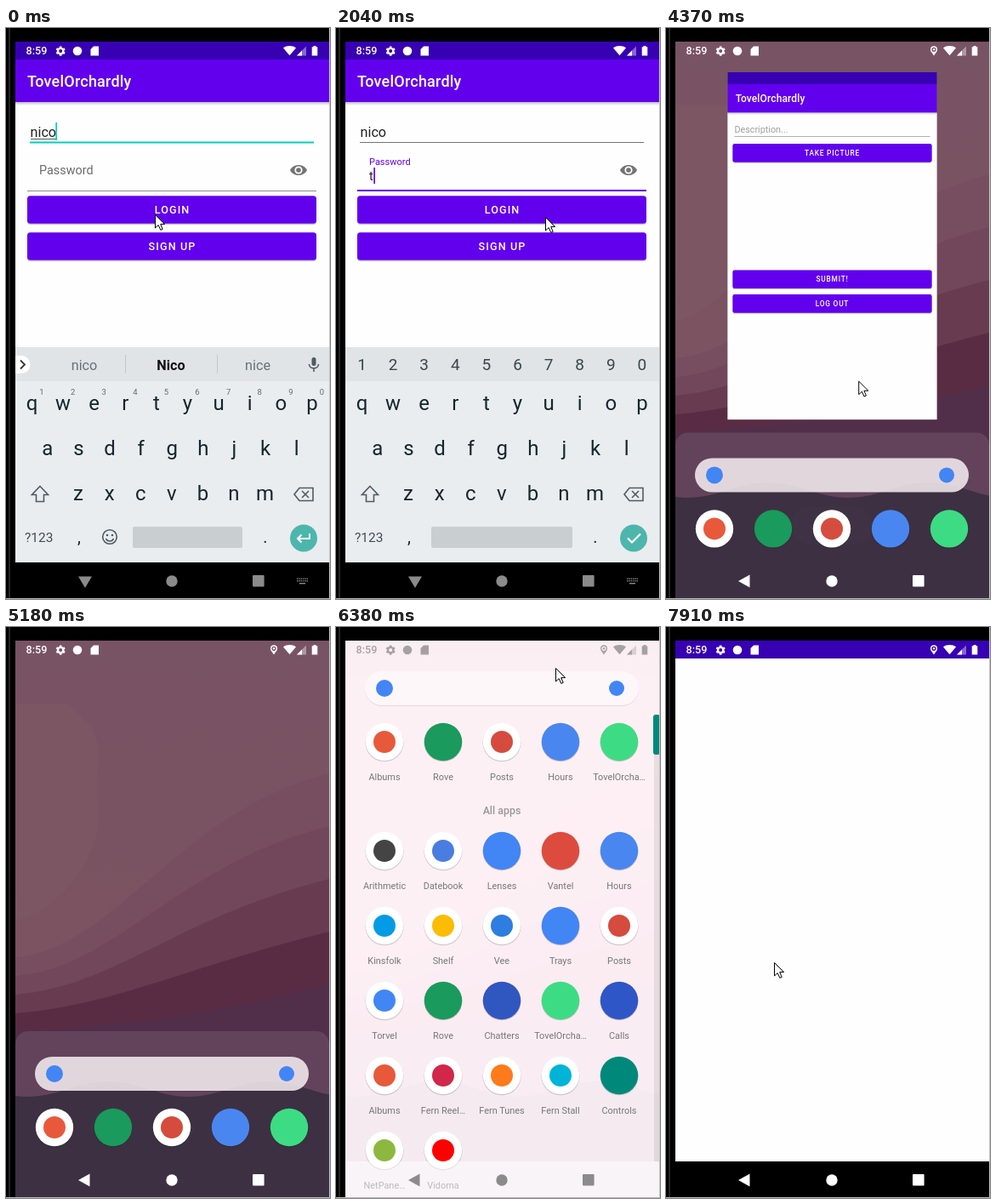
An HTML page that plays this animation: 381 px wide and 671 px high, repeating every 8000 ms.

```html
<!DOCTYPE html>
<html lang="en">
<head>
<meta charset="utf-8">
<title>Login and relaunch</title>
<style>
html, body { margin: 0; width: 100%; height: 100%; overflow: hidden; background: #000; }
svg { display: block; width: 100vw; height: 100vh; }
text { font-family: Roboto, "Open Sans", sans-serif; white-space: pre; }
</style>
</head>
<body>
<svg id="stage" viewBox="0 0 381 671"></svg>
<script>
const LOOP = 8000, STEP = 136;
const PURPLE = '#6200ee', DARK = '#3700b3', INK = '#14262e', SOFT = '#4f5b62';
const APP = 'TovelOrchardly';

// ---- markup helpers ----
const range = n => [...Array(n).keys()];
const rect = (x, y, w, h, fill, more = '') =>
  `<rect x="${x}" y="${y}" width="${w}" height="${h}" fill="${fill}" ${more}/>`;
const band = (y, h, fill, more) => rect(11, y, 369, h, fill, more);
const disc = (x, y, r, fill, more = '') => `<circle cx="${x}" cy="${y}" r="${r}" fill="${fill}" ${more}/>`;
const path = (d, fill, more = '') => `<path d="${d}" fill="${fill}" ${more}/>`;
const line = (d, color, w = 1.6) => path(d, 'none', `stroke="${color}" stroke-width="${w}"`);
const text = (x, y, size, str, fill, more = '') =>
  `<text x="${x}" y="${y}" font-size="${size}" fill="${fill}" ${more}>${str}</text>`;
const mid = (x, y, size, str, fill, more = '') => text(x, y, size, str, fill, `text-anchor="middle" ${more}`);
const group = (id, ...parts) => `<g id="${id}">${parts.join('')}</g>`;
const button = (x, y, w, str) =>
  rect(x, y + 1, w, 33, '#000', 'rx="4" opacity=".22"') + rect(x, y, w, 32.5, PURPLE, 'rx="3.5"') +
  mid(195.5, y + 21, 12.6, str, '#fff', 'font-weight="500" letter-spacing="1.1"');

// ---- app icons: name, colour, plain (fills the plate) ----
const icons = {
  albums: ['Albums', '#e8593c'], rove: ['Rove', '#1a9a5c', 1], posts: ['Posts', '#d54b3d'],
  hours: ['Hours', '#4a86f0', 1], own: [APP.slice(0, 10) + '…', '#3ddc84', 1],
  sums: ['Arithmetic', '#444'], dates: ['Datebook', '#4a7de0'], lens: ['Lenses', '#4285f4', 1],
  web: ['Vantel', '#dd4b3e', 1], kin: ['Kinsfolk', '#039be5'], shelf: ['Shelf', '#fbbc05'],
  vee: ['Vee', '#2e7de0'], trays: ['Trays', '#4285f4', 1], find: ['Torvel', '#4285f4'],
  chat: ['Chatters', '#3056c0', 1], call: ['Calls', '#2f56c6', 1], reel: ['Fern Reel…', '#d0274a'],
  tune: ['Fern Tunes', '#ff7a1a'], stall: ['Fern Stall', '#00b4d8'], ctrl: ['Controls', '#00897b', 1],
  pane: ['NetPane…', '#8cb83f'], vid: ['Vidorna', '#f00']
};
const icon = (key, x, y) => {
  const [, color, plain] = icons[key];
  return disc(x, y + 0.8, 22.5, '#000', 'opacity=".2"') +
    disc(x, y, 22.2, plain ? color : '#fff') + (plain ? '' : disc(x, y, 13, color));
};
const tag = (key, x, y) => mid(x, y + 45, 10.9, icons[key][0], '#777');
const cells = (fn, keys, y) => keys.split(' ').map((k, i) => fn(k, 57 + 69 * i, y)).join('');
const grid = fn => cells(fn, 'albums rove posts hours own', 135) +
  ['sums dates lens web hours', 'kin shelf vee trays posts', 'find rove chat own call',
    'albums reel tune stall ctrl', 'pane vid'].map((keys, r) => cells(fn, keys, 263 + 88 * r)).join('');

// ---- screens ----
const dunes = ['#d88dae', '#cf80a5', '#bd6b92', '#a4507a', '#935687'].map((fill, i) => {
  const l = 388 + 22 * i, r = 172 + 62 * i;
  return path(`M11 ${l}C130 ${l - 10} 200 ${r + 45} 380 ${r}V671H11Z`, fill);
}).join('');
const hills = path('M11 671' + range(38).map(i => {
  const x = 11 + 10 * i;
  return `L${x} ${543 - 9 * Math.cos((x - 120) / 30)}`;
}).join('') + 'V671Z', '#46304f');
const wall = band(16, 655, 'url(#sky)') +
  path('M11 90H70C130 130 100 160 108 210S70 330 11 345Z', '#e6a2b4', 'opacity=".6"') +
  dunes + hills + group('shade', band(16, 50, 'url(#dusk)'));

const login = group('login',
  band(87, 541, '#fefefe'),
  text(28.5, 128, 16.2, 'nico', '#222'),
  group('userOn', rect(28, 133.5, 334, 2, '#03cfbd'), rect(29, 130, 30, 1, '#555'),
    group('userCaret', rect(58.3, 111, 1.7, 21, '#03cfbd'))),
  group('userOff', rect(28, 134, 334, 1, '#757575')),
  group('passOff', text(39, 172, 14.4, 'Password', '#6b6b6b'), rect(25, 191, 340, 1, '#8a8a8a')),
  group('passOn', text(39, 161, 11, 'Password', PURPLE), rect(25, 190, 340, 2, PURPLE),
    group('typed', text(39, 179, 14.4, 't', '#222')), group('passCaret', rect(44.3, 164, 1.7, 19, PURPLE))),
  path('M334 167C338 159 350 159 354 167C350 175 338 175 334 167Z', '#747474'),
  disc(344, 167, 4.6, '#fff'), disc(344, 167, 2.8, '#747474'),
  button(25, 197.3, 340, 'LOGIN'), button(25, 240.3, 340, 'SIGN UP'),
  group('press', rect(25, 197.3, 340, 32.5, '#fff', 'rx="3.5" opacity=".2"')));

const main = group('main',
  band(87, 541, '#fefefe'),
  text(23, 123, 16.2, 'Description...', '#a0a0a0'), rect(23, 128.7, 345, 1, '#8c8c8c'),
  button(20, 142, 351, 'TAKE PICTURE'), button(20, 364.4, 351, 'SUBMIT!'), button(20, 407.4, 351, 'LOG OUT'));

const keyRow = (chars, x, y, size, fill) =>
  [...chars].map((c, i) => mid(x + 36.6 * i, y, size, c, fill)).join('');
const keys = group('keys',
  band(375, 253, '#e9edf0'), band(375, 40, '#e0e4e7'),
  keyRow('qwertyuiop', 30.5, 449, 24, INK), keyRow('asdfghjkl', 48.8, 502, 24, INK),
  keyRow('zxcvbnm', 85, 555, 24, INK),
  line('M40 538.5L49.5 548.5H44.5V556.5H35.5V548.5H30.5Z', SOFT),
  line('M345 540.5H361V555.5H345L339 548ZM348 544L356 552M356 544L348 552', SOFT),
  text(22, 604, 15.5, '?123', '#3f4d54'), mid(86, 605, 20, ',', INK), mid(305, 605, 20, '.', INK),
  disc(350, 599.5, 16, '#4db6ac'),
  group('words',
    keyRow('1234567890', 42, 431, 9.5, '#5f6b72'),
    path('M11 385H18A10.5 10.5 0 0 1 18 406H11Z', '#fff'), line('M17 390.5L22 395.5L17 400.5', '#333', 1.8),
    mid(92, 402, 16.2, 'nico', '#66727a'), mid(194, 402, 16.2, 'Nico', '#111', 'font-weight="700"'),
    mid(296, 402, 16.2, 'nice', '#66727a'),
    rect(140, 384, 1, 22, '#c3c8cb'), rect(248, 384, 1, 22, '#c3c8cb'),
    rect(359.5, 387, 5, 10, SOFT, 'rx="2.5"'), line('M356.5 395C356.5 401.5 367.5 401.5 367.5 395M362 400V404', SOFT),
    disc(122, 598, 8.3, 'none', `stroke="${SOFT}" stroke-width="1.6"`),
    disc(119, 596, 1.3, SOFT), disc(125, 596, 1.3, SOFT), line('M117.5 600C119 604 125 604 126.5 600', SOFT),
    rect(149, 586, 129, 25, '#c9ced1', 'rx="2"'),
    line('M357 594V600H343M347.5 595.5L343 600L347.5 604.5', '#fff', 2)),
  group('digits', keyRow('1234567890', 30.5, 402, 19, '#37474f'),
    rect(112, 586, 166, 25, '#c9ced1', 'rx="2"'), line('M343 599.5L348 604.5L358 594.5', '#fff', 2.2)));

const bar = band(87, 4, 'url(#drop)') + band(37, 50, PURPLE) + band(16, 21, DARK) +
  text(25, 69, 18, APP, '#fff', 'font-weight="500" letter-spacing=".2"');

const panel = group('panel',
  group('flat', band(0, 720, '#fff6f9', 'class="sheet"')),
  group('glow', band(0, 720, 'url(#fade)', 'class="sheet"')),
  group('list', grid(icon)),
  group('labels', rect(374, 103, 6, 525, '#000', 'opacity=".08"'), rect(373, 103, 8, 47, '#00897b', 'rx="3"'),
    mid(195, 219.5, 12.4, 'All apps', '#999', 'font-weight="500"'), grid(tag)),
  group('pill', rect(34, 53, 322, 40, '#000', 'rx="20" opacity=".1"'), rect(34, 52, 322, 40, '#fef7fa', 'rx="20"')),
  disc(57, 72, 10, '#4285f4'), disc(330, 72, 9, '#4285f4'));

const ON = 'currentColor';
const gear = range(6).map(i => rect(62.9, 21.5, 2.6, 3, ON, `transform="rotate(${60 * i} 64.2 27.1)"`)).join('') +
  disc(64.2, 27.1, 3.2, 'none', `stroke="${ON}" stroke-width="2.3"`);
const status = group('status',
  text(23.5, 31.3, 12.6, '8:59', ON, 'font-weight="500"'), gear,
  disc(84, 27, 5.3, ON), path('M103 21.5H109V32.5H99.5V25Z', ON),
  group('pin', disc(315, 25.3, 3.3, 'none', `stroke="${ON}" stroke-width="1.4"`), disc(315, 25.3, 1.2, ON),
    path('M311.6 27.5L315 32.5L318.4 27.5L315 29.2Z', ON)),
  path('M326 23.5C330 20.3 337 20.3 341 23.5L333.5 32.3Z', ON),
  path('M353 21.5V32.5H342Z', ON, 'opacity=".4"'), path('M348 26.5V32.5H342Z', ON),
  path('M361.5 21H364.5V22.3H366.3V32.5H359.7V22.3H361.5Z', ON));

const dots = range(12).map(i => rect(342 + 2.3 * (i % 6), i < 6 ? 646.5 : 649, 1.4, 1.4, ON)).join('');
const nav = group('nav',
  group('down', path('M85 644.5H101L93 658Z', ON), dots, rect(345, 652, 7, 1.4, ON)),
  group('back', path('M85 650L98.5 642.5V657.5Z', ON)),
  disc(195, 650, 6.7, ON), rect(290, 643, 13.6, 13.6, ON, 'rx="1"'));

const gradient = (id, ...stops) => `<linearGradient id="${id}" x2="0" y2="1">` +
  stops.map(([o, c, a = 1]) => `<stop offset="${o}" stop-color="${c}" stop-opacity="${a}"/>`).join('') + '</linearGradient>';

const stage = document.getElementById('stage');
stage.innerHTML = '<defs>' +
  gradient('sky', [0, '#da96b3'], [0.5, '#df96b1']) +
  gradient('dusk', [0, '#000', 0.22], [1, '#000', 0]) +
  gradient('drop', [0, '#000', 0.25], [1, '#000', 0]) +
  gradient('fade', [0, '#fff'], [0.3, '#fff', 0]) +
  `<clipPath id="view">${band(16, 612, '#000')}</clipPath></defs>` +
  wall + group('dim', band(16, 655, '#000')) +
  group('date', mid(195, 73, 21.5, 'Wednesday, Mar 3', '#fff')) +
  group('dock', cells(icon, 'call chat stall web', 0)) +
  panel + group('navTint', band(628, 43, '#fff')) + group('navBack', band(628, 43, '#000')) +
  group('app', `<g clip-path="url(#view)">${login + main + bar + keys}</g>`) +
  group('splash', band(16, 612, '#fefefe'), band(16, 21, DARK)) +
  group('toast', rect(148, 563, 94, 44, '#efefef', 'rx="21"'), mid(195, 590, 12.6, 'Success!', '#333')) +
  status + nav +
  path('M0 0H381V16H11V671H0Z', '#000') + rect(3, 0, 2, 671, '#252525') +
  rect(380, 0, 1, 671, '#c4c4c4') + rect(0, 670, 381, 1, '#b5b5b5') +
  group('mouse', path('M.5 .5V16L4.2 12.6L6.8 18.4L9.2 17.4L6.7 11.6H11.6Z', '#fff', 'stroke="#000"'));

const el = {};
stage.querySelectorAll('g[id]').forEach(g => el[g.id] = g);
const sheets = stage.querySelectorAll('.sheet');

// ---- motion ----
const show = (id, a) => {
  el[id].setAttribute('opacity', +a);
  el[id].setAttribute('display', a > 0 ? 'inline' : 'none');
};
const move = (id, x, y, s = 1) => el[id].setAttribute('transform', `translate(${x} ${y}) scale(${s})`);
const mix = (a, b, k) => a + (b - a) * k;
const part = (t, a, b) => Math.min(1, Math.max(0, (t - a) / (b - a)));
const ease = (t, a, b) => { const k = part(t, a, b); return k * k * (3 - 2 * k); };

// Pointer legs: leave, arrive, x, y.
const legs = [
  [140, 530, 112, 168], [1050, 1350, 246, 222], [2600, 3390, 292.5, 654], [3820, 4640, 200, 320],
  [4800, 5160, 206, -40], [5300, 5700, 122, 592], [5707, 6256, 258, 48], [6400, 6960, 245, 447], [7360, 7880, 127, 394]
];
const pointer = t => legs.reduce(([x, y], [a, b, u, v]) => {
  const k = ease(t, a, b);
  return [mix(x, u, k), mix(y, v, k)];
}, [175, 219]);

function draw(t) {
  // Login form
  const onPass = t >= 650, numeric = t >= 780;
  show('userOn', !onPass);
  show('userOff', onPass);
  show('passOn', onPass);
  show('passOff', !onPass);
  show('words', !numeric);
  show('digits', numeric);
  show('userCaret', t < 400);
  show('typed', t >= 910);
  show('passCaret', t < 1200 || t >= 1620);
  show('press', t >= 1620 && t < 1900);

  // Next screen
  const enter = ease(t, 2180, 2450);
  show('main', enter);
  move('main', 0, 60 * (1 - enter));
  move('keys', 0, 253 * enter);
  show('down', enter < 0.5);
  show('back', enter >= 0.5);

  // Overview card, thrown off the top
  const k = ease(t, 3683, 4370), s = 1 - k / 3, fling = part(t, 4800, 5160);
  show('toast', ease(t, 2320, 2600) * (1 - ease(t, 4090, 4370)));
  show('app', fling < 1);
  move('app', 195.5 * (1 - s), 16 + 36 * k - 16 * s - 560 * fling ** 2, s);

  // Home, then the app sheet is pulled up
  const home = ease(t, 5180, 5440), pull = part(t, 5707, 6256) ** 1.8;
  const y = 722 - 197 * k + 77 * home - 530 * pull;
  const lift = part(y, 72, 172), soft = Math.min(1, 1.35 * pull);
  show('shade', home);
  show('dim', 0.45 * k * (1 - home));
  move('panel', 0, y - 72);
  sheets.forEach(r => {
    r.setAttribute('y', 16 + 6 * lift);
    r.setAttribute('rx', 15 * lift);
  });
  show('flat', 0.1 * (1 - home) + 0.94 * pull ** 0.5);
  show('glow', 2.2 * pull * (1 - pull));
  show('list', mix(1, soft, home));
  show('labels', soft);
  show('pill', mix(0.82, 0.45 + 0.55 * pull, home));
  show('date', home * (1 - pull) ** 3);
  show('dock', home * (1 - pull) ** 3);
  move('dock', 0, y - 74);

  // Launch from the icon
  const grow = ease(t, 7300, 7770);
  show('splash', grow);
  move('splash', 264 * (1 - grow), 440 * (1 - grow), grow);

  const pale = pull > 0.7 && grow < 0.4;
  show('navTint', 0.5 * pull);
  show('navBack', 1 - k + grow);
  el.status.setAttribute('color', pale ? '#a5a1a3' : '#fff');
  el.nav.setAttribute('color', pale || t < 3800 ? '#8b8b8b' : '#fff');
  show('pin', t >= 3800);
  move('mouse', ...pointer(t));
}

const start = performance.now();
function loop() {
  const t = (performance.now() - start) % LOOP;
  draw(Math.floor(t / STEP) * STEP);
  requestAnimationFrame(loop);
}
loop();
</script>
</body>
</html>
```
